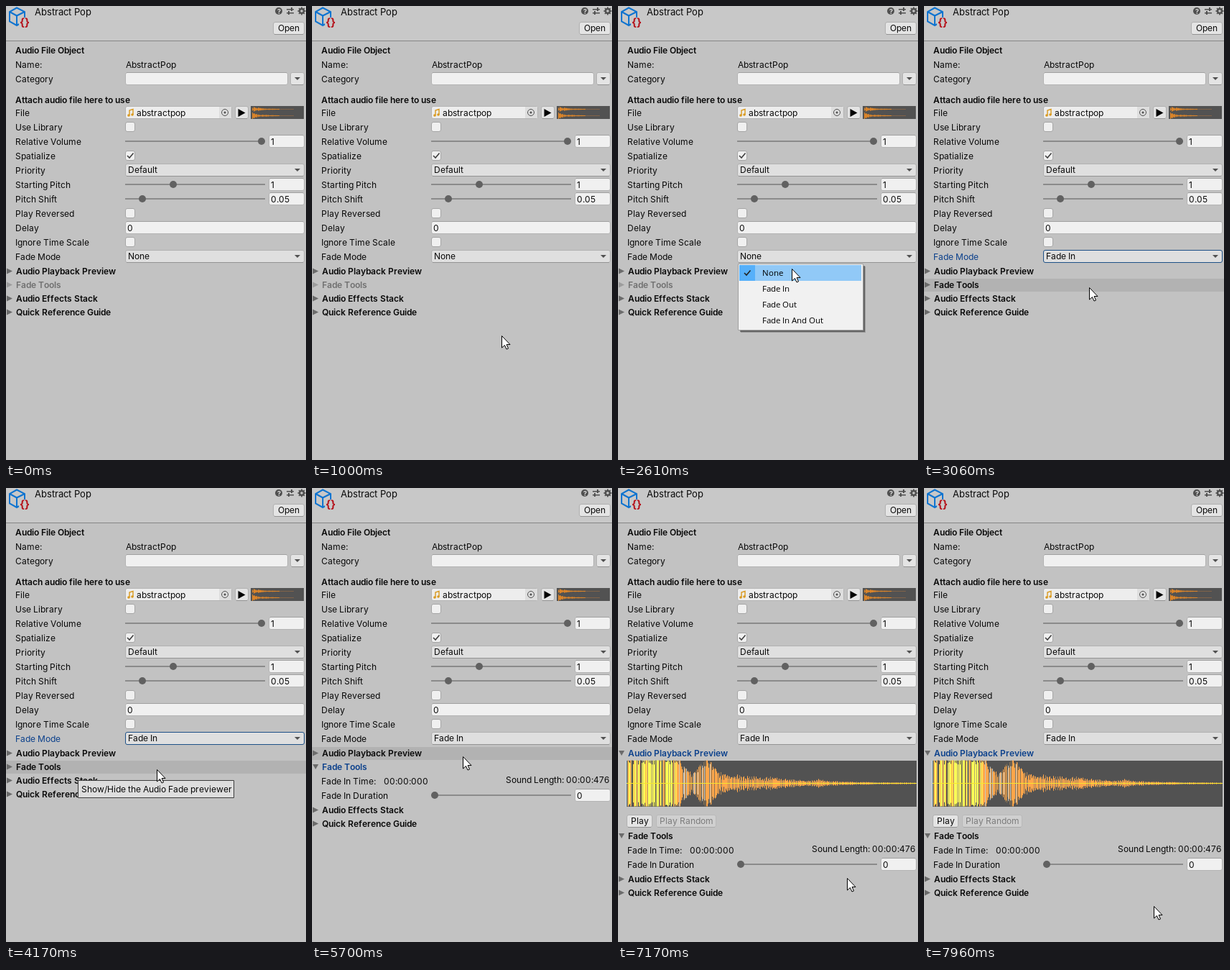
These frames come from a looping animation (418 px wide and 631 px high, 7.99 s). An HTML page with a canvas:

```html
<!DOCTYPE html>
<html lang="en">
<head>
<meta charset="utf-8">
<style>
html, body { margin: 0; width: 100%; height: 100%; overflow: hidden; background: #c2c2c2; }
canvas { display: block; }
</style>
</head>
<body>
<canvas id="stage" width="418" height="631"></canvas>
<script>
const ctx = document.getElementById('stage').getContext('2d');
const LOOP = 7990, INK = '#090909', BLUE = '#0c418c', ORANGE = '#ffa64a', YELLOW = '#ffff55';
const OPEN_MENU = 1880, PICK = 2850, FADE_FOCUS = 4360, FADE_OPEN = 4540,
      PREVIEW_FOCUS = 5820, PREVIEW_OPEN = 5910;

// Pointer path: time, x, y, exponent of the ease-out leading there
const path = [
  [590, 283, 636, 1], [1390, 255, 367, 1.5], [1600, 255, 344, 1.4],
  [2400, 255, 344, 1], [2610, 242, 365, 1], [2760, 238, 388, 1.3], [2880, 238, 388, 1],
  [3060, 230, 391, 1.3], [3810, 230, 391, 1], [4170, 210, 391, 1], [5130, 210, 391, 1],
  [5390, 210, 381, 1], [5550, 210, 381, 1], [5700, 210, 373, 1], [5760, 210, 372, 1],
  [6500, 210, 372, 1], [6670, 298, 461, 1], [7290, 321, 548, 1.6], [7470, 321, 560, 1.3],
  [7630, 321, 560, 1], [7960, 320, 581, 1.2], [LOOP, 320, 581, 1]
];
const clicks = [[1780, 1940], [2760, 2850], [4330, 4540], [5790, 5910]];

const noise = n => { const v = Math.sin(n * 127.1 + 3.7) * 43758.5453; return v - Math.floor(v); };
const during = (t, a, b) => t >= a && t < b;

function pointerAt(t) {
  if (t < path[0][0]) return path[0].slice(1, 3);
  const i = path.findIndex(p => p[0] > t), [t0, x0, y0] = path[i - 1], [t1, x1, y1, power] = path[i];
  const k = 1 - (1 - (t - t0) / (t1 - t0)) ** power;
  return [Math.round(x0 + (x1 - x0) * k), Math.round(y0 + (y1 - y0) * k)];
}

// Interface text snaps every glyph to whole pixels and has no kerning
const advances = {};
const advance = (font, ch) => advances[font + ch] ??= Math.round(ctx.measureText(ch).width);

function text(s, x, baseline, color = INK, font = '12px Inter, sans-serif', align = 0) {
  ctx.font = font;
  ctx.fillStyle = color;
  const widths = [...s].map(ch => advance(font, ch));
  x = Math.round(x - align * widths.reduce((a, b) => a + b, 0));
  [...s].forEach((ch, i) => {
    ctx.fillText(ch, x, baseline);
    x += widths[i];
  });
}
const bold = (s, x, y, color) => text(s, x, y, color, '600 12px Inter, sans-serif');

function rect(x, y, w, h, color) {
  ctx.fillStyle = color;
  ctx.fillRect(x, y, w, h);
}

function box(x, y, w, h, fill, border, radius = 2.5) {
  ctx.beginPath();
  ctx.roundRect(x + .5, y + .5, w - 1, h - 1, radius);
  ctx.fillStyle = fill;
  ctx.fill();
  ctx.strokeStyle = border;
  ctx.lineWidth = 1;
  ctx.stroke();
}

function shape(points, fill, stroke, width = 1, close = true) {
  ctx.beginPath();
  points.forEach(p => ctx.lineTo(...p));
  if (close) ctx.closePath();
  if (fill) { ctx.fillStyle = fill; ctx.fill(); }
  if (stroke) { ctx.strokeStyle = stroke; ctx.lineWidth = width; ctx.stroke(); }
}

function disc(x, y, r, fill) {
  ctx.beginPath();
  ctx.arc(x, y, r, 0, 7);
  ctx.fillStyle = fill;
  ctx.fill();
}

function ring(x, y, r, color, width) {
  ctx.beginPath();
  ctx.arc(x, y, r, 0, 7);
  ctx.strokeStyle = color;
  ctx.lineWidth = width;
  ctx.stroke();
}

function input(x, y, w, value = '') {
  box(x, y, w, 18, '#f0f0f0', '#b3b3b3');
  rect(x + 2, y, w - 4, 1, '#a0a0a0');
  text(value, x + 3, y + 14);
}

function button(x, y, w, label = '', fill = '#e4e4e4', disabled = false) {
  box(x, y, w, 18, disabled ? '#d0d0d0' : fill, disabled ? '#b9b9b9' : '#b0b0b0');
  rect(x + 2, y + 17, w - 4, 1, disabled ? '#aaaaaa' : '#939393');
  text(label, x + w / 2, y + 13, disabled ? '#7c7c7c' : INK, undefined, .5);
}

const arrowDown = (x, y) => shape([[x - 4, y - 2], [x + 4, y - 2], [x, y + 2]], '#505050');

function dropdown(y, value, focused) {
  button(166, y, 250, '', '#dfdfdf');
  if (focused) box(166, y, 250, 18, '#dfdfdf', '#1d5087');
  text(value, 170, y + 13);
  arrowDown(406, y + 9);
}

function slider(y, knob, value) {
  rect(166, y - 1, 195, 2, '#8b8b8b');
  disc(knob, y, 5, '#616161');
  input(366, y - 9, 50, value);
}

function tick(x, y, color) {
  shape([[x - 4, y], [x - 1, y + 3], [x + 4.5, y - 3.5]], null, color, 1.6, false);
}

function checkbox(y, on) {
  box(166, y - 7, 14, 14, '#f0f0f0', '#a6a6a6');
  if (on) tick(173, y, '#404040');
}

function foldout(label, y, { open, focused, disabled, hover } = {}) {
  if (hover) rect(0, y - 9, 418, 18, '#b2b2b2');
  const points = open ? [[1, y - 4], [9, y - 4], [5, y + 3]] : [[1, y - 4.5], [9, y - .5], [1, y + 3.5]];
  shape(points, disabled ? '#9c9c9c' : '#6b6b6b');
  bold(label, 14, y + 4, focused ? BLUE : disabled ? '#707070' : INK);
}

function header() {
  rect(0, 0, 418, 48, '#c8c8c8');
  rect(0, 48, 418, 1, '#858585');
  const cube = '#0f74d0';
  shape([[15, 2.5], [26, 8], [26, 21], [15, 27], [5, 21.5], [5, 8]], null, cube, 2);
  shape([[5, 8], [15, 13.5], [26, 8]], null, cube, 2, false);
  shape([[15, 13.5], [15, 27]], null, cube, 2, false);
  rect(18, 16, 15, 15, '#c8c8c8');
  text('{}', 25.5, 28, '#b5121b', '700 15px Inter, sans-serif', .5);
  text('Abstract Pop', 40, 13, INK, '13px Inter, sans-serif');
  disc(380, 7, 5, '#505050');
  text('?', 380, 10.5, '#e0e0e0', '700 9px Inter, sans-serif', .5);
  rect(391, 4, 10, 1.5, '#505050');
  rect(391, 9, 10, 1.5, '#505050');
  rect(397, 2, 2, 5, '#505050');
  rect(393, 7, 2, 5, '#505050');
  ring(412, 7, 3, '#505050', 2.4);
  for (let a = 0; a < 8; a++) {
    const c = Math.cos(a * Math.PI / 4), s = Math.sin(a * Math.PI / 4);
    shape([[412 + 3 * c, 7 + 3 * s], [412 + 5.5 * c, 7 + 5.5 * s]], null, '#505050', 1.8, false);
  }
  button(372, 22, 44, 'Open');
}

function fileRow() {
  box(166, 139, 149, 18, '#ededed', '#b3b3b3');
  rect(297, 140, 17, 16, '#dedede');
  ring(305, 148, 4.5, '#505050', 1);
  disc(305, 148, 1.5, '#505050');
  const note = '#d99a20';
  shape([[172, 152], [172, 145], [177, 143.5], [177, 151]], null, note, 1.4, false);
  disc(171, 152, 1.8, note);
  disc(176, 151, 1.8, note);
  text('abstractpop', 182, 153);
  button(319, 139, 19);
  shape([[323.5, 143], [333.5, 148.5], [323.5, 154]], '#000');
  rect(341, 139, 74, 18, '#525252');
  for (const y of [143.5, 152.5]) {
    for (let i = 0; i < 58; i++) {
      const a = .5 + 4.5 * Math.exp(-i / 10) * noise(i + y);
      rect(343 + i, y - a, 1, 2 * a, i < 38 ? '#d8832a' : '#806349');
    }
  }
}

function settings(t) {
  const picked = t >= PICK, focused = during(t, PICK, FADE_FOCUS);
  bold('Audio File Object', 13, 66);
  text('Name:', 13, 86);
  text('AbstractPop', 167, 86);
  text('Category', 13, 106);
  input(166, 92, 227);
  button(396, 92, 20);
  arrowDown(406, 101);
  bold('Attach audio file here to use', 13, 135);
  ['File', 'Use Library', 'Relative Volume', 'Spatialize', 'Priority', 'Starting Pitch', 'Pitch Shift',
    'Play Reversed', 'Delay', 'Ignore Time Scale', 'Fade Mode'].forEach((label, i) =>
    text(label, 13, 153 + i * 20, i === 10 && focused ? BLUE : INK));
  fileRow();
  checkbox(168);
  slider(188, 356, '1');
  checkbox(208, true);
  dropdown(219, 'Default');
  slider(248, 233, '1');
  slider(268, 190, '0.05');
  checkbox(288);
  input(166, 299, 250, '0');
  checkbox(328);
  dropdown(339, picked ? 'Fade In' : 'None', focused);
}

function preview() {
  const mid = 410.5;
  rect(12, 379, 404, 64, '#525252');
  for (let x = 13; x < 415; x++) {
    const n = noise(x), bump = (c, w) => Math.exp(-(((x - c) / w) ** 2));
    const decay = 27 * Math.exp(-(x - 84) / 125) * (1 - x / 900) * (1 - .4 * bump(104, 7));
    const envelope = x < 88 ? 40 : decay + 16 * bump(124, 12) + 2 * bump(213, 12) + 2 * bump(278, 10);
    // Narrow spikes: every third column or so falls back toward the centre
    const spike = x < 140 ? 1 : .45 + .55 * Math.abs(Math.cos(x * 1.08));
    const a = Math.max(.5, Math.min(32, envelope * spike * (.65 + .45 * n)));
    const gap = noise(x + 500);
    let color = ORANGE;
    if (x < 82) color = n < .5 ? YELLOW : n < .74 ? ORANGE : n < .88 ? '#b4aa70' : '#565550';
    else if (x < 140) color = gap > .8 ? '#c9c5ba' : gap > .55 ? '#8a7455' : ORANGE;
    else if (gap > .65) color = '#b08a5c';
    rect(x, mid - a, 1, 2 * a, color);
  }
  rect(12, 410, 404, 1, '#f5e62e');
  rect(11, 379, 1, 64, '#c3dcf2');
  button(12, 454, 36, 'Play');
  button(53, 454, 84, 'Play Random', undefined, true);
}

function foldouts(t) {
  const previewOpen = t >= PREVIEW_OPEN, fadeOpen = t >= FADE_OPEN;
  const fadeY = previewOpen ? 484 : 388, effectsY = fadeY + (fadeOpen ? 60 : 19);
  foldout('Audio Playback Preview', 369, {
    open: previewOpen, focused: t >= PREVIEW_FOCUS, hover: during(t, 5640, PREVIEW_OPEN)
  });
  if (previewOpen) preview();
  foldout('Fade Tools', fadeY, {
    open: fadeOpen, disabled: t < PICK,
    focused: during(t, FADE_FOCUS, PREVIEW_FOCUS), hover: during(t, 2880, FADE_OPEN)
  });
  if (fadeOpen) {
    text('Fade In Time:', 13, fadeY + 24);
    text('00:00:000', 100, fadeY + 24);
    text('Sound Length: 00:00:476', 414, fadeY + 22, INK, undefined, 1);
    text('Fade In Duration', 13, fadeY + 44);
    slider(fadeY + 39, 171, '0');
  }
  foldout('Audio Effects Stack', effectsY);
  foldout('Quick Reference Guide', effectsY + 19);
}

function menu(t, pointerY) {
  ctx.globalAlpha = Math.min(1, .3 + (t - OPEN_MENU) / 180);
  rect(171, 362, 174, 92, 'rgba(0,0,0,.2)');
  rect(170, 361, 174, 92, 'rgba(0,0,0,.35)');
  box(167, 358, 175, 93, '#f1f1f1', '#a0a0a0', 0);
  const hovered = pointerY < 360 ? -1 : Math.floor((pointerY - 360) / 22);
  if (hovered >= 0) rect(169, 360 + hovered * 22, 170, 22, '#91c9f7');
  rect(169, 360, 22, 22, hovered === 0 ? '#56b0fa' : '#91c9f7');
  tick(180, 371, '#222');
  ['None', 'Fade In', 'Fade Out', 'Fade In And Out'].forEach((label, i) =>
    text(label, 201, 375 + i * 22, '#000', '11.5px "Open Sans", "Noto Sans", sans-serif'));
  ctx.globalAlpha = 1;
}

function tooltip(x, y, w, lines) {
  box(x, y, w, 10 + lines.length * 15, '#dedede', '#3c3c3c', 0);
  lines.forEach((line, i) => text(line, x + 5, y + 17 + i * 15));
}

function pointer(x, y) {
  const outline = [[0, 0], [0, 16.5], [4, 13], [6.5, 18.5], [9, 17.5], [6.6, 12], [11.5, 12]];
  shape(outline.map(([dx, dy]) => [x + dx + .5, y + dy + .5]), '#fff', '#000');
}

function draw(t) {
  const [x, y] = pointerAt(t);
  rect(0, 0, 418, 631, '#c2c2c2');
  header();
  settings(t);
  foldouts(t);
  if (during(t, OPEN_MENU, PICK)) menu(t, y);
  if (during(t, 3550, 4330)) tooltip(100, 406, 218, ['Show/Hide the Audio Fade previewer']);
  if (during(t, 6300, 6710)) tooltip(59, 387, 300, [
    'Allows you to preview how your AudioFileObject',
    'will sound during runtime right here in the inspector.',
    'Some effects, like spatialization and delay, will not',
    'be available to preview'
  ]);
  if (clicks.some(([a, b]) => during(t, a, b))) disc(x, y, 12, 'rgba(244,240,20,.72)');
  if (t >= 620) pointer(x, y);
}

const start = performance.now();
function tickFrame() {
  draw((performance.now() - start) % LOOP);
  requestAnimationFrame(tickFrame);
}
tickFrame();
</script>
</body>
</html>
```
